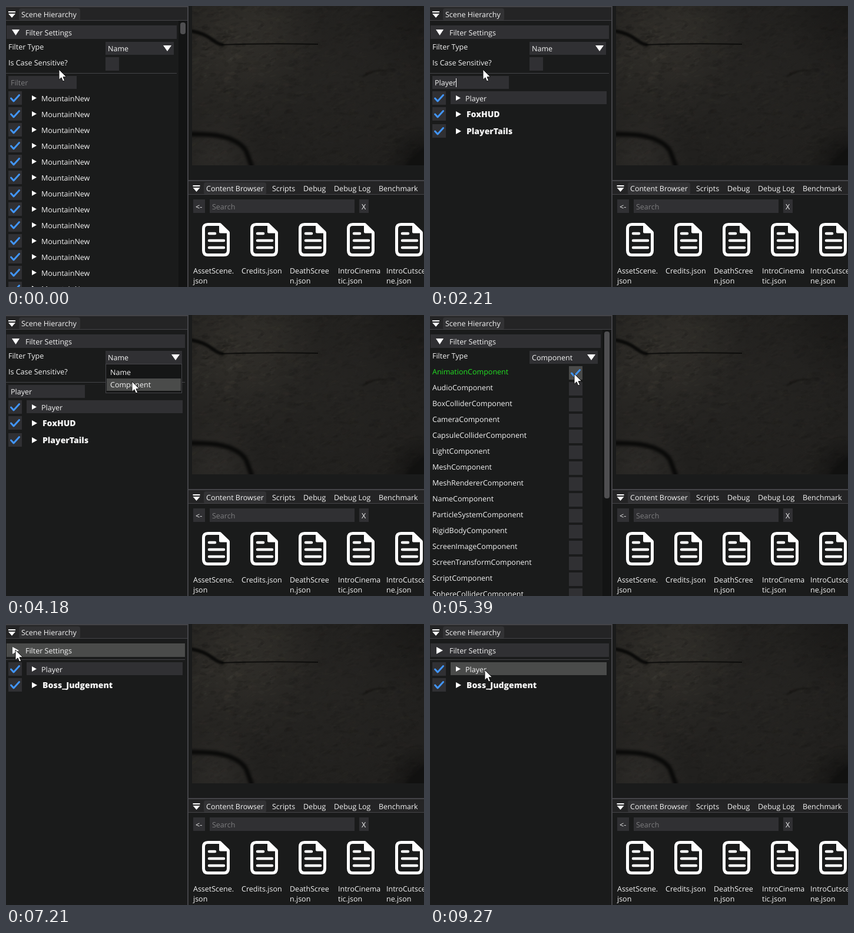
Animation of 710x478 px, one loop 9300 ms. Source, as an HTML page with a canvas:

```html
<!DOCTYPE html>
<html lang="en">
<head>
<meta charset="utf-8">
<title>Scene hierarchy filter</title>
<style>
  html, body { margin: 0; width: 100%; height: 100%; overflow: hidden; background: #1a1b1b; }
  canvas, svg { position: absolute; left: 0; top: 0; }
  #rock { left: 316px; }
  text { font: 12.5px "Open Sans", "Noto Sans", sans-serif; fill: #f4f4f4; white-space: pre; text-rendering: geometricPrecision; }
  .bold { font-size: 14px; font-weight: 800; }
  .hint { fill: #7c7c7e; }
  .on { fill: #22e022; }
</style>
</head>
<body>
<canvas id="rock" width="394" height="271"></canvas>
<svg width="710" height="478" viewBox="0 0 710 478">
  <g id="browser"></g>
  <g id="panel"></g>
  <path id="mouse" d="M0 0V17.5L4 13.8L6.6 20L9.6 18.7L7 12.7H12.6Z" fill="#fff" stroke="#111" stroke-width="1"/>
</svg>
<script>
const LOOP = 9300;
const WIDGET = '#303033', HOVER = '#4a4b4a', EDGE = '#444448', BAR = '#242425', BLUE = '#4296fa';
const $ = id => document.getElementById(id);

const rect = (x, y, w, h, fill, r = 0) =>
  `<rect x="${x}" y="${y}" width="${w}" height="${h}" rx="${r}" fill="${fill}"/>`;
const shape = (d, fill = '#fff') => `<path d="${d}" fill="${fill}"/>`;
const line = (d, color, width) =>
  `<path d="${d}" fill="none" stroke="${color}" stroke-width="${width}" stroke-linecap="round" stroke-linejoin="round"/>`;
// y is the visual middle of the line
const text = (x, y, s, cls = '') =>
  `<text x="${x}" y="${y + 5}" class="${cls}">${s.replace('<', '&lt;')}</text>`;
const menuIcon = (x, y) => shape(`M${x} ${y}h12v2h-12zM${x} ${y + 4}h12l-6 7z`);

// ---- viewport -------------------------------------------------------------
function drawRock() {
  const c = $('rock').getContext('2d');
  let seed = 7;
  const rnd = () => (seed = (seed * 16807) % 2147483647) / 2147483647;
  const glow = (x, y, r, rgb, a) => {
    const g = c.createRadialGradient(x, y, 0, x, y, r);
    g.addColorStop(0, `rgba(${rgb},${a})`);
    g.addColorStop(1, `rgba(${rgb},0)`);
    c.fillStyle = g;
    c.fillRect(0, 0, 394, 271);
  };
  const crack = (d, width, blur, alpha = 1) => {
    c.filter = `blur(${blur}px)`;
    c.strokeStyle = `rgba(10,10,9,${alpha})`;
    c.lineWidth = width;
    c.stroke(new Path2D(d));
    c.filter = 'none';
  };
  c.fillStyle = '#21201e';
  c.fillRect(0, 0, 394, 271);
  glow(60, 85, 150, '70,66,58', 0.32);
  glow(110, 20, 120, '70,66,58', 0.25);
  glow(40, 255, 80, '70,67,62', 0.3);
  glow(230, 120, 160, '60,57,52', 0.16);
  for (let i = 0; i < 2600; i++) {
    const x = rnd() * 394, y = rnd() * 271, rough = Math.max(0.35, 1 - Math.hypot(x - 70, y - 70) / 230);
    const tone = rnd() < 0.5 ? '78,74,66' : '8,8,8';
    c.fillStyle = `rgba(${tone},${0.15 * rough * rnd()})`;
    c.beginPath();
    c.ellipse(x, y, 2 + rnd() * 7, 1 + rnd() * 2.5, -0.7 + rnd() * 0.9, 0, 7);
    c.fill();
  }
  glow(394, 271, 70, '8,8,8', 0.7);
  glow(394, 0, 120, '8,8,8', 0.3);
  crack('M-4 42Q20 46 34 57T54 65', 6, 1.5);
  crack('M50 66Q120 63 214 65', 2, 0.7, 0.85);
  crack('M-4 218Q40 217 62 225T92 247L102 274', 8, 2);
  crack('M290 120Q310 106 330 111', 2, 1, 0.4);
  c.filter = 'blur(2px)';
  c.fillStyle = '#111110';
  c.fill(new Path2D('M362 275Q372 255 398 238V275Z'));
  c.filter = 'none';
}

// ---- content browser ------------------------------------------------------
function drawBrowser() {
  const tabs = [[340, 'Content Browser'], [452, 'Scripts'], [505, 'Debug'], [557, 'Debug Log'], [633, 'Benchmark']];
  const files = [['AssetScene.', 'json'], ['Credits.json'], ['DeathScree', 'n.json'], ['IntroCinema', 'tic.json'], ['IntroCutsce', 'ne.json']];
  const file = (lines, i) => {
    const x = 318 + i * 82;
    return line(`M${x + 45} 371.5H${x + 25}Q${x + 17.5} 371.5 ${x + 17.5} 379V416Q${x + 17.5} 423.5 ${x + 25} 423.5H${x + 52}Q${x + 59.5} 423.5 ${x + 59.5} 416V386`, '#fff', 5)
      + line(`M${x + 46} 371.5V384.5H${x + 59.5}Z`, '#fff', 4) + shape(`M${x + 46} 371V385H${x + 60}Z`)
      + line(`M${x + 27} 387h10M${x + 27} 399h25M${x + 27} 411h25`, '#fff', 4.5)
      + lines.map((s, n) => text(x, 450 + n * 17, s)).join('');
  };
  return rect(308, 0, 2, 478, EDGE) + rect(310, 296, 400, 2, EDGE)
    + rect(310, 298, 400, 22, BAR) + rect(336, 300, 106, 21, '#323234', 4) + rect(310, 320, 400, 1, EDGE)
    + menuIcon(317.5, 305) + tabs.map(([x, s]) => text(x, 310, s)).join('')
    + rect(318, 329, 20, 23, WIDGET) + text(322, 341, '<-')
    + rect(346, 329, 246, 23, WIDGET) + text(350, 341, 'Search', 'hint')
    + rect(600, 329, 16, 23, WIDGET) + text(604, 341, 'X')
    + files.map(file).join('');
}

// ---- timeline -------------------------------------------------------------
const KEYS = [800, 1030, 1320, 1600, 1940, 2110];
const OPEN = 3520, PICK = 4420, CHECK = 5130, FOLD = 6730;
const PATH = [[0, 90, 108], [2300, 90, 108], [3050, 204, 68], [3750, 204, 68], [4150, 214, 113], [4560, 214, 113],
  [5000, 245, 100], [5740, 245, 100], [6450, 16, 44], [7210, 16, 44], [7440, 82, 95], [7640, 93, 78], [LOOP, 93, 78]];

function mouseAt(t) {
  const i = PATH.findIndex(p => p[0] > t), [t0, x0, y0] = PATH[i - 1], [t1, x1, y1] = PATH[i];
  const k = (t - t0) / (t1 - t0), e = k * k * (3 - 2 * k);
  return [Math.round(x0 + (x1 - x0) * e), Math.round(y0 + (y1 - y0) * e)];
}

function caretOn(t) {
  if (t > OPEN) return false;
  const last = KEYS.filter(k => k <= t).pop();
  const age = last === undefined ? t + 900 : t - last - 300;
  return age <= 0 || age % 1200 < 800;
}

// ---- hierarchy panel ------------------------------------------------------
const P = 'Env_Platform_';
const ALL = Array(13).fill('MountainNew');
const PLATFORMS = ['Player', P + 'Stairs_Prefab', '*BossArena', '*Platform_Nouveau',
  ...['Round_Prefab', 'Round_Prefab', 'Straight_Prefab (8)', 'Straight_Prefab', 'Connector_Prefab',
    'Round_Prefab', 'Straight_Prefab', 'Straight_Prefab'].map(s => '*' + P + s)];
const PLAYERS = ['Player', '*FoxHUD', '*PlayerTails'];
const BOSS = ['Player', '*Boss_Judgement'];
const COMPONENTS = ['Animation', 'Audio', 'BoxCollider', 'Camera', 'CapsuleCollider', 'Light', 'Mesh', 'MeshRenderer', 'Name',
  'ParticleSystem', 'RigidBody', 'ScreenImage', 'ScreenTransform', 'Script', 'SphereCollider'];

const ruler = document.createElement('canvas').getContext('2d');
ruler.font = '12.5px "Open Sans", "Noto Sans", sans-serif';

const tick = (x, y) => line(`M${x + 4.5} ${y + 12}l4.5 5l9.5 -10.5`, BLUE, 3);

function drawPanel(t, mx, my) {
  const popup = t >= OPEN && t < PICK, byComponent = t >= PICK, folded = t >= FOLD;
  const typed = 'Player'.slice(0, KEYS.filter(k => k <= t).length);
  const narrow = typed.length < 4 || (byComponent && !folded);
  const W = narrow ? 290 : 304;
  const fill = (x, y, w, h, base = WIDGET) =>
    !popup && mx >= x && mx < x + w && my >= y && my < y + h ? HOVER : base;
  const widget = (x, y, w, h, base) => rect(x, y, w, h, fill(x, y, w, h, base));

  const rows = (items, y) => `<svg width="${W}" height="478">` + items.map(item => {
    const bold = item[0] === '*', h = bold ? 25 : 23, top = y;
    const lit = item === 'Player' || (item === BOSS[1] && t > 7380 && t < 8500);
    y += h + 4;
    return rect(4, top, 23, 23, WIDGET) + tick(4, top) + widget(35, top, W - 39, h - 1, lit ? WIDGET : 'none')
      + (bold ? shape(`M44 ${top + 7}v10l9 -5z`) + text(62, top + 12, item.slice(1), 'bold')
              : shape(`M44 ${top + 7}v9l8 -4.5z`) + text(60, top + 12, item));
  }).join('') + '</svg>';

  const scrollbar = h => rect(293, 25, 15, 453, '#131414') + rect(296, 28, 9, h, '#4f4f51', 4);

  let out = rect(0, 0, 308, 2, EDGE) + rect(0, 2, 308, 22, BAR) + rect(22, 4, 104, 21, '#323234', 4)
    + rect(0, 24, 308, 1, EDGE) + menuIcon(4, 9) + text(26, 14, 'Scene Hierarchy')
    + widget(1, 33, W - 1, 23)
    + shape(folded ? 'M11 39v12l11 -6z' : 'M10 40h13l-6.5 10z') + text(33, 45, 'Filter Settings');
  if (folded) return out + rect(0, 60, W, 1, EDGE) + rows(BOSS, 65);

  out += text(4, 69, 'Filter Type') + widget(169, 61, W - 174, 22)
    + shape(`M${W - 23} 67h14l-7 10z`) + text(173, 72, byComponent ? 'Component' : 'Name');
  if (byComponent) {
    return out + COMPONENTS.map((name, i) => {
      const y = 97 + i * 27, on = !i && t >= CHECK;
      return text(4, y - 1, name + 'Component', on ? 'on' : '') + widget(236, y - 10, 23, 23) + (on ? tick(236, y - 10) : '');
    }).join('') + scrollbar(284);
  }

  out += text(4, 96, 'Is Case Sensitive?') + widget(169, 87, 23, 23) + rect(0, 114, W, 1, EDGE)
    + rect(4, 119, W - 174, 22, WIDGET) + text(8, 130, typed || 'Filter', typed ? '' : 'hint');
  if (caretOn(t)) out += rect(Math.round(8 + ruler.measureText(typed).width), 123, 1, 15, '#fff');
  out += rows(typed.length > 3 ? PLAYERS : typed ? PLATFORMS : ALL, 145);
  if (narrow) out += scrollbar(typed ? 35 : 20);
  if (popup) {
    const low = my > 105;
    out += rect(169, 83, 130, 50, EDGE) + rect(170, 84, 128, 48, '#151616')
      + rect(171, low ? 108 : 86, 126, 21, HOVER) + text(177, 97, 'Name') + text(177, 118, 'Component');
  }
  return out;
}

// ---- run ------------------------------------------------------------------
let shown = '';
function frame() {
  const t = performance.now() % LOOP, [x, y] = mouseAt(t), next = drawPanel(t, x, y);
  if (next !== shown) $('panel').innerHTML = shown = next;
  $('mouse').setAttribute('transform', `translate(${x} ${y})`);
  requestAnimationFrame(frame);
}
drawRock();
$('browser').innerHTML = drawBrowser();
frame();
</script>
</body>
</html>
```
